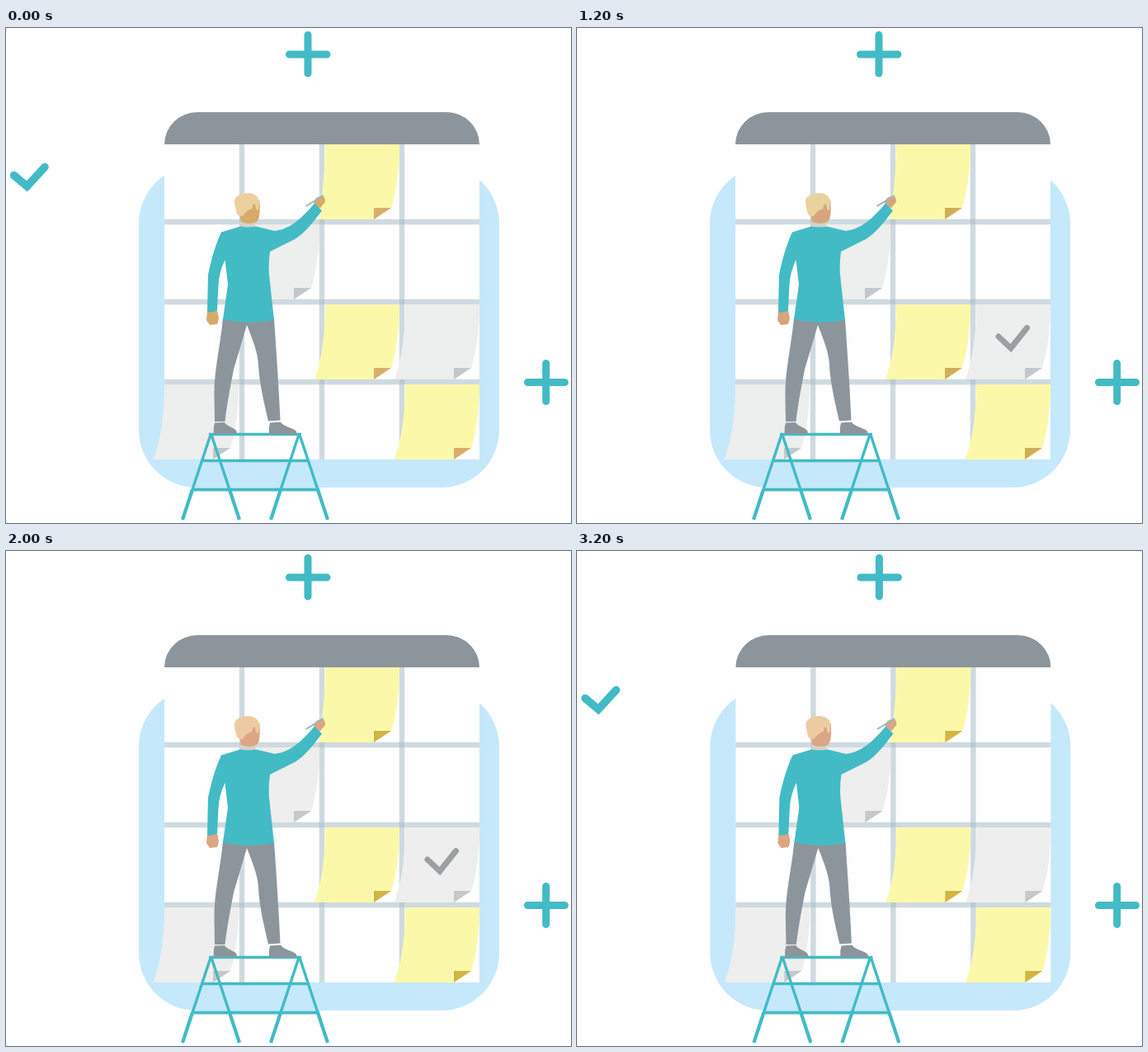
These frames come from a looping animation (685x600 px, 3.6 s). An HTML page:

```html
<!DOCTYPE html>
<html lang="en">
<head>
<meta charset="utf-8">
<title>Planning board</title>
<style>
  html, body { margin: 0; width: 100%; height: 100%; overflow: hidden; background: #fff; }
  svg { display: block; }
  .teal { fill: #42bbc5; }
  .slate { fill: #8d959c; }
  .hair { fill: var(--hair); }
  .skin { fill: var(--skin); }
  .yellow { fill: #fbf9a9; }
  .yellow + path { fill: var(--fold); }
  .grey { fill: var(--paper); }
  .grey + path { fill: var(--shade); }
  .mark { fill: none; stroke: #42bbc5; stroke-width: 9; stroke-linecap: round; }
  .ink { stroke: #9c9fa1; stroke-width: 5; }
  .grid { fill: none; stroke: #a9bdc8; stroke-opacity: .55; stroke-width: 6.4; }
  .ladder { fill: none; stroke: #42bbc5; stroke-width: 3.4; }
</style>
</head>
<body>
<svg id="stage" width="685" height="600" viewBox="0 0 685 600">
  <g id="scene">
    <rect x="161" y="167" width="437" height="390" rx="70" fill="#c6e8fb"/>
    <rect x="192" y="141" width="382" height="382" fill="#fefefe"/>
    <path d="M192 141A40 39 0 0 1 232 102H534A40 39 0 0 1 574 141Z" class="slate"/>
    <path class="grid" d="M286 141V523M383 141V523M480 141V523"/>
    <path class="grid" d="M192 235H574M192 332H574M192 429H574"/>
    <g id="notes"></g>

    <path class="mark ink plus-in" d="M409 281H450M429.5 260.500V302"/>
    <path class="mark ink plus-in" d="M212.500 470H253M230 449.500V491"/>
    <path class="mark ink check-in" style="stroke-width:7" d="M511 374L526 388L545.500 363.500"/>

    <path class="ladder" d="M246 492.500H358M238 524.500H367"/>
    <path class="ladder" d="M248 493L226 559.500M249 493L271 559.500M355 493L333 559.500M356 493L378 559.500"/>
    <path class="ladder" style="stroke-width:4.200" d="M225 559.500H380M226 559.500L214 596M271 559.500L283 596M333 559.500L321 596M378 559.500L390 596"/>

    <path class="slate" d="M263 352C260 385 252 415 252.500 445L253 477H265.500C268 455 273 430 276 414L292 360C299 378 305 392 306 408C307 430 313 455 318 476.500L332.500 475.500C331 440 328 395 325 352Z"/>
    <path class="slate" d="M253 478.500L265 478C268 484 279 484 280 490L279 492H252Q251 485 253 478.500Z"/>
    <path class="slate" d="M320 478.500L333 477.500C337 484 351 485 352.500 490L351 492.500H319Q318 485 320 478.500Z"/>

    <path class="skin" d="M244 343L256 342L258 352L256 359L247 360L243 354Z"/>
    <path class="skin" d="M373 212L376 206L383 203L386.500 206L387 211L381 218L376 217Z"/>
    <path d="M363.500 216L385 203" stroke="#8fb8c4" stroke-width="2"/>
    <path d="M283 235H302V242H283Z" fill="#d3d2cb"/>
    <path class="teal" d="M284 240.500Q294 242.500 303 240.500L326 246C346 243 358 231 374 212.500L383 221.500C372 236 362 249 350 256L320 271Q318 285 319 299L325 354Q294 360 263 353L269 311L265.500 281Q258 297 257.500 312L256 342Q250 346 244 344L245 299Q251 269 261 247.500Z"/>
    <path class="skin" d="M283 224L300 209H307.500C308 222 308 230 304 235Q295 239 285 235Z"/>
    <path class="hair" d="M277 212C276 203 286 200 293 200C301 200 307 204 307 211L306 221L303.500 220L302 214Q299 212 298.500 219Q291 221 287 228Q280 229 279 222Z"/>
    <path class="mark plus-out" d="M343.500 32H389M366 8.500V55"/>
    <path class="mark check-out" style="stroke-width:9.500" d="M9.500 178.500L25.500 192L47 168.500"/>
  </g>
  <path class="mark plus-out" d="M632.500 429.500H677.500M654.700 406.500V452.500"/>
</svg>
<script>
const STEP = 400;
const notes = [
  ['yellow', 387, 141, -8],
  ['grey', 290, 238, -13],
  ['yellow', 387, 335, -13],
  ['grey', 484, 335, -13],
  ['grey', 192, 432, -13.5],
  ['yellow', 484, 432, -13.5]
];
document.getElementById('notes').innerHTML = notes.map(([tone, x, y, foot]) =>
  `<g transform="translate(${x} ${y})">
    <path class="${tone}" d="M0 0H90C90 28 87 55 80 77L59 91H${foot}C-4 66 0 35 0 0Z"/>
    <path d="M59 77H80L59 91Z"/>
  </g>`).join('');

const palettes = {
  ochre: { hair: '#ecd0a0', skin: '#d6ab69', fold: '#d9ae6b', paper: '#edeeee', shade: '#c1c9cc' },
  sand: { hair: '#e8d29e', skin: '#d6a580', fold: '#d0ae54', paper: '#edeeee', shade: '#c1c9cf' },
  peach: { hair: '#eccba2', skin: '#dca583', fold: '#d0b545', paper: '#eeeeee', shade: '#c8c8c8' }
};

// sideways wobble, palette, check on board, pluses on board
const steps = [
  [0, 'ochre', false, false],
  [0, 'sand', false, false],
  [1, 'sand', false, false],
  [0, 'sand', true, false],
  [1, 'peach', true, true],
  [0, 'peach', true, false],
  [0, 'peach', false, false],
  [0, 'peach', false, false],
  [0.4, 'peach', false, false]
];

const stage = document.getElementById('stage');
const scene = document.getElementById('scene');
const show = (name, on) => {
  for (const el of stage.querySelectorAll('.' + name)) el.style.display = on ? '' : 'none';
};

let shown = -1;
function draw(i) {
  const [dx, palette, checkIn, plusIn] = steps[i];
  scene.setAttribute('transform', `translate(${dx} 0)`);
  for (const [key, color] of Object.entries(palettes[palette])) stage.style.setProperty('--' + key, color);
  show('check-in', checkIn);
  show('check-out', !checkIn);
  show('plus-in', plusIn);
  show('plus-out', !plusIn);
  shown = i;
}

const start = performance.now();
function tick() {
  const i = Math.floor((performance.now() - start) / STEP) % steps.length;
  if (i !== shown) draw(i);
  requestAnimationFrame(tick);
}
draw(0);
requestAnimationFrame(tick);
</script>
</body>
</html>
```
